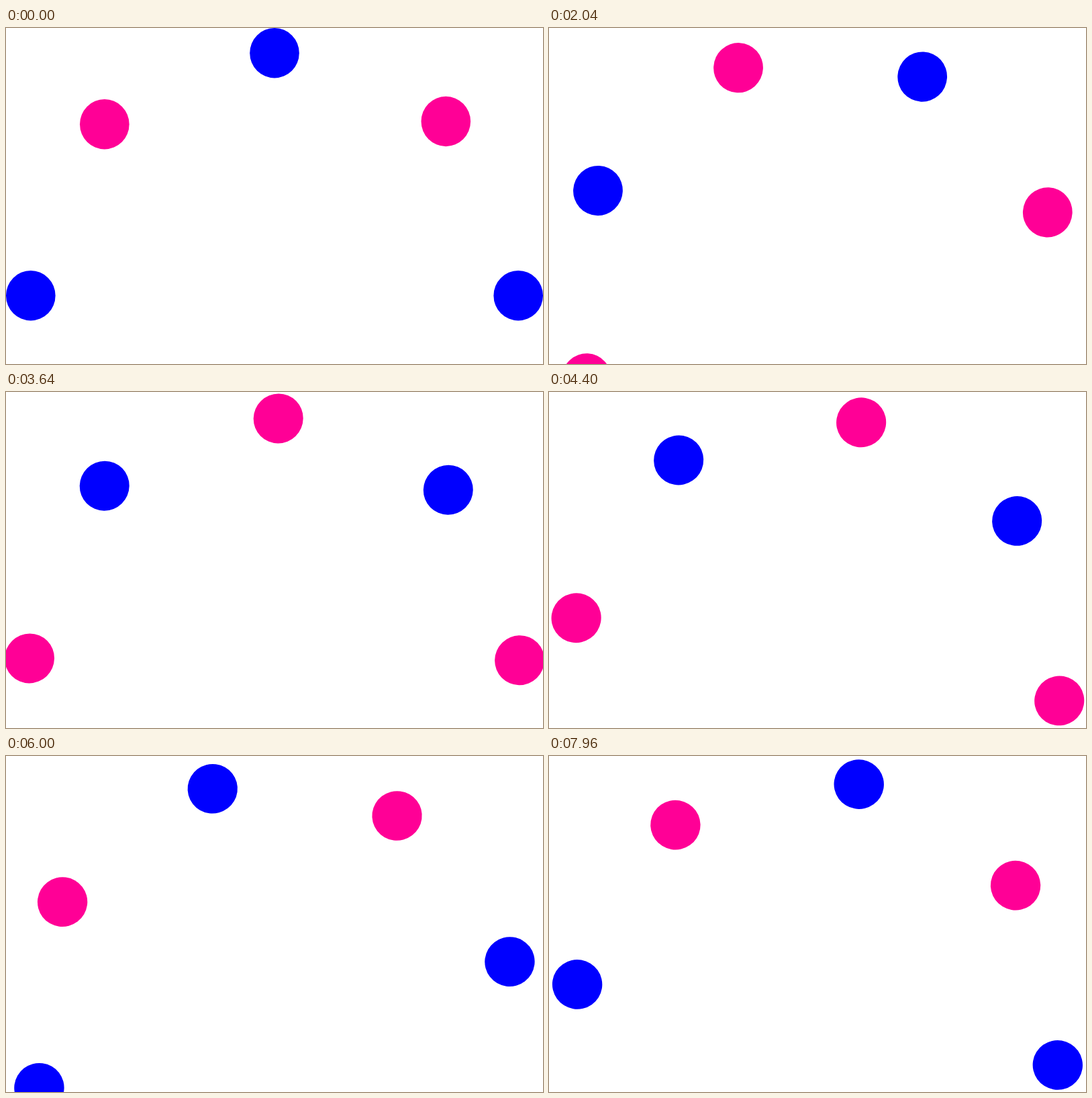
Recreate the animation shown at these times as an HTML page. Size 800 by 500 pixels, loop 8 s.

```html
<!DOCTYPE html>
<html lang="en">
<head>
<meta charset="utf-8">
<title>Turning ring of dots</title>
<style>
  html, body { margin: 0; width: 100%; height: 100%; overflow: hidden; background: #fff; }
  svg { display: block; width: 100%; height: 100%; }
</style>
</head>
<body>
<svg viewBox="0 0 800 500"><g id="ring"></g></svg>
<script>
  const LOOP = 8000, STEP = 40, DEGREES_PER_STEP = 0.5;
  const BLUE = '#0000ff', PINK = '#ff0096';
  const ring = document.getElementById('ring');

  // Dot centres relative to the centre of the ring
  const dots = [
    [0, -362.8, BLUE],
    [363.2, -1.8, BLUE],
    [-0.2, 362.9, BLUE],
    [-363.2, -1.8, BLUE],
    [-253.2, -256.8, PINK],
    [255.3, -261, PINK],
    [-258.4, 257.8, PINK],
  ];

  for (const [cx, cy, fill] of dots) {
    const dot = document.createElementNS('http://www.w3.org/2000/svg', 'ellipse');
    const attributes = { cx, cy, rx: 36.8, ry: 37.2, fill };
    for (const name in attributes) dot.setAttribute(name, attributes[name]);
    ring.append(dot);
  }

  function draw() {
    const time = performance.now() % LOOP;
    const angle = Math.floor(time / STEP) * DEGREES_PER_STEP;
    ring.setAttribute('transform', `translate(400 400) rotate(${angle})`);
    requestAnimationFrame(draw);
  }
  draw();
</script>
</body>
</html>
```
